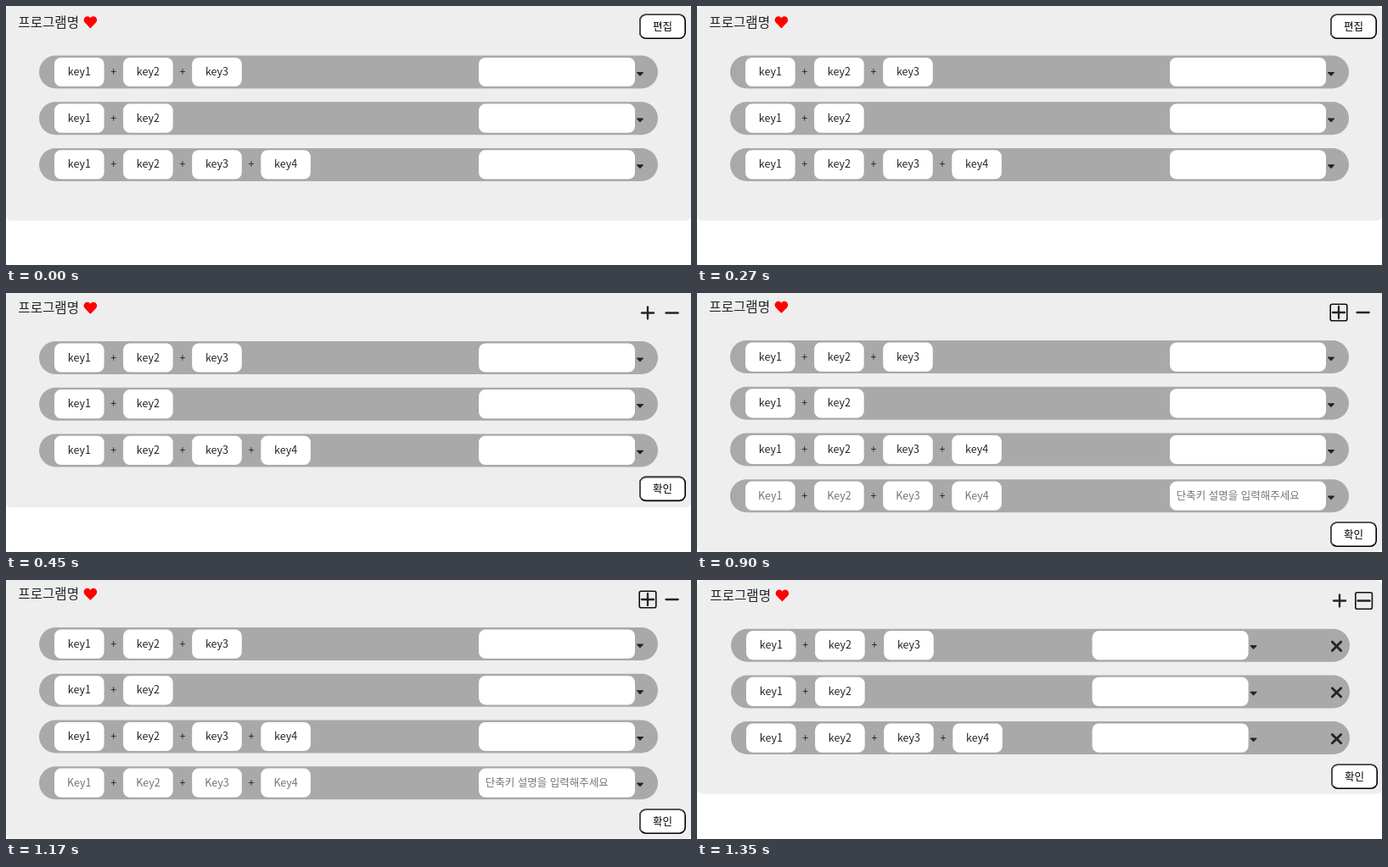
Animation, 807 px wide and 306 px high, one loop 1800 ms. Source, as an HTML page:

```html
<!DOCTYPE html>
<html lang="ko">
<head>
<meta charset="utf-8">
<title>단축키 편집</title>
<style>
  html, body { margin: 0; width: 100%; height: 100%; overflow: hidden; background: #fff; }
  svg { display: block; width: 807px; height: 306px; }
  text { font: 12.5px "Noto Sans CJK KR", "Noto Sans", sans-serif; fill: #212529; }
  .title { font-size: 15.6px; }
  .mid { text-anchor: middle; }
  .hint { fill: #757575; }
  .button { fill: #000; }
  .icon { fill: none; stroke: #212529; stroke-linecap: round; stroke-linejoin: round; }
</style>
</head>
<body>
<svg id="stage" viewBox="0 0 807 306"></svg>
<script>
const STEP = 450;
const ROW_PITCH = 54.7;
const KEY_PITCH = 81.1;
const ROWS = [3, 2, 4];
const HEART = 'M462 63C408 16 326 24 276 76L256 97L236 76C186 24 104 16 50 63' +
  'C-13 116-16 212 40 270L233 470C246 483 266 483 279 470L472 270C528 212 525 116 462 63Z';

// dx, dy: position of the content; top, bottom: panel edges
const scenes = [
  { dx: 0, dy: 0, top: 0, bottom: 253.5, edit: 24.3 },
  { dx: 0, dy: -1.5, top: -8, bottom: 253.5, tools: 23.5, confirm: 231.4 },
  { dx: 0, dy: -2.4, top: -8, bottom: 305.6, tools: 23, confirm: 285.2, focus: 756, adding: true },
  { dx: 1, dy: -0.8, top: 0, bottom: 252.6, tools: 24.5, confirm: 232.2, focus: 784.6, removing: true }
];

const box = (x, y, w, h, r, fill) =>
  `<rect x="${x}" y="${y}" width="${w}" height="${h}" rx="${r}" fill="${fill}"/>`;
const label = (x, y, words, kind = '') => `<text x="${x}" y="${y}" class="${kind}">${words}</text>`;
const icon = (d, width) => `<path class="icon" d="${d}" stroke-width="${width}"/>`;

function row(cy, count, scene, blank) {
  const fieldX = scene.removing ? 464.6 : 557;
  const caretX = fieldX + 190;
  let out = box(39, cy - 19.5, 729, 39, 19.5, '#a9a9a9');
  for (let i = 0; i < count; i++) {
    const x = 57 + i * KEY_PITCH;
    out += box(x, cy - 17.1, 58.6, 34.2, 7.8, '#fff');
    out += label(x + 29.3, cy + 4, (blank ? 'Key' : 'key') + (i + 1), blank ? 'mid hint' : 'mid');
    if (i) out += label(x - 11.3, cy + 4, '+', 'mid');
  }
  out += box(fieldX, cy - 17.1, 184, 34.2, 7.8, '#fff');
  if (blank) out += label(fieldX + 7.8, cy + 4.6, '단축키 설명을 입력해주세요', 'hint');
  out += `<path d="M${caretX - 3.4} ${cy + 0.5}h6.8l-3.4 3.5z" fill="#212529"
    stroke="#212529" stroke-width="1.2" stroke-linejoin="round"/>`;
  if (scene.removing) out += icon(`M747.3 ${cy - 4.2}l10.4 10.4m0-10.4l-10.4 10.4`, 2.8);
  return out;
}

// Outset border: lighter along the top and left edges
function button(cy, words) {
  const top = cy - 14;
  return `<rect x="746.8" y="${top}" width="53.4" height="28" rx="7" fill="#fff" stroke="#000" stroke-width="1.6"/>
    <path d="M748.8 ${top + 26}a7 7 0 0 1-2-5v-14a7 7 0 0 1 7-7h39.4a7 7 0 0 1 5 2"
      fill="none" stroke="#4c4c4c" stroke-width="1.6"/>` +
    label(773.5, cy + 4.7, words, 'mid button');
}

function tools({ tools: cy, focus }) {
  let out = icon(`M748.9 ${cy}h14.2m-7.1-7.1v14.2M777.5 ${cy}h14.2`, 2.3);
  if (focus) out += `<rect x="${focus - 9.8}" y="${cy - 9.8}" width="19.6" height="19.6" rx="2"
    fill="none" stroke="#101010" stroke-width="1.6"/>`;
  return out;
}

function draw(scene) {
  const { dx, dy, top, bottom } = scene;
  const rowY = i => 78 + dy + i * ROW_PITCH;
  let out = label(14.3, 24.5 + dy, '프로그램명', 'title');
  out += `<path d="${HEART}" fill="red" transform="translate(91.6 ${11.3 + dy}) scale(.0305)"/>`;
  ROWS.forEach((count, i) => out += row(rowY(i), count, scene));
  if (scene.adding) out += row(rowY(3), 4, scene, true);
  if (scene.edit) out += button(scene.edit, '편집');
  if (scene.tools) out += tools(scene);
  if (scene.confirm) out += button(scene.confirm, '확인');
  return box(0, 0, 807, 306, 0, '#fff') + box(0, top, 807, bottom - top, 6, '#eee') +
    `<g transform="translate(${dx} 0)">${out}</g>`;
}

const stage = document.getElementById('stage');
stage.innerHTML = scenes.map(scene => `<g>${draw(scene)}</g>`).join('');

const duration = STEP * scenes.length;
[...stage.children].forEach((group, i) => group.animate(
  [
    { opacity: 1, easing: 'step-end' },
    { opacity: 0, offset: 1 / scenes.length },
    { opacity: 0 }
  ],
  { duration, delay: i * STEP - duration, iterations: Infinity }
));
</script>
</body>
</html>
```
